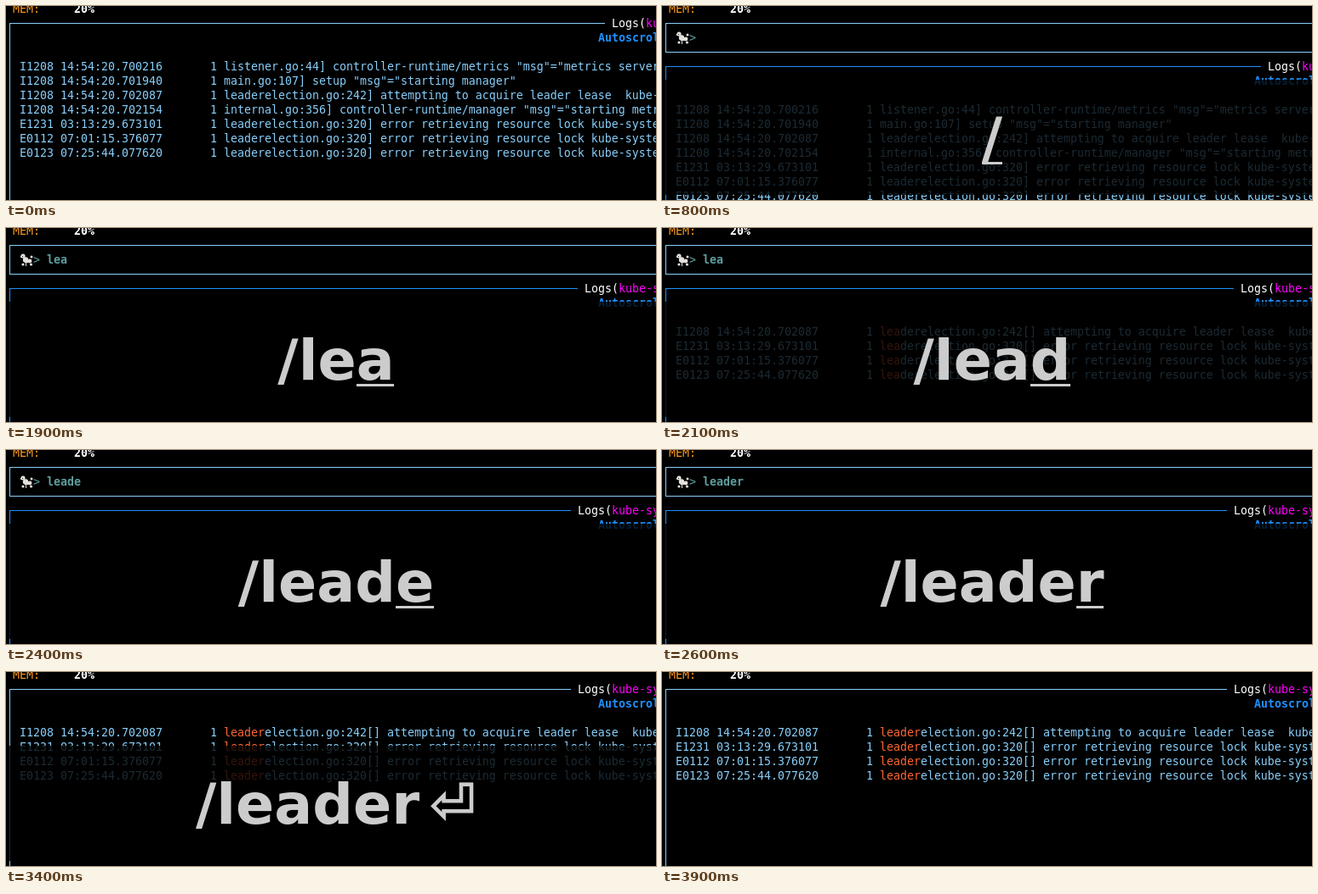
An HTML page with a canvas for the animation above (5.5 s loop, 764 by 229 pixels).

```html
<!DOCTYPE html>
<html lang="en">
<head>
<meta charset="utf-8">
<title>Log filter</title>
<style>
  html, body { margin: 0; width: 100%; height: 100%; overflow: hidden; background: #000; }
  canvas { display: block; }
</style>
</head>
<body>
<canvas id="stage" width="764" height="229"></canvas>
<script>
const W = 764, H = 229, LOOP = 5500, CELL = 8, ROW = 17;
const ctx = document.getElementById('stage').getContext('2d', { alpha: false });

const MONO = '13.29px "DejaVu Sans Mono", monospace';
const KEYS = 'bold 66.67px "DejaVu Sans", sans-serif';
const SKY = '#87cefa', DODGER = '#1e90ff', CADET = '#5f9ea0', MATCH = '#ff6633';

const election = 'leaderelection.go:';
const lockError = election + '320] error retrieving resource lock kube-system';
const logs = [
  ['I1208 14:54:20.700216', 'listener.go:44] controller-runtime/metrics "msg"="metrics server is starting'],
  ['I1208 14:54:20.701940', 'main.go:107] setup "msg"="starting manager"'],
  ['I1208 14:54:20.702087', election + '242] attempting to acquire leader lease  kube-system'],
  ['I1208 14:54:20.702154', 'internal.go:356] controller-runtime/manager "msg"="starting metrics server"'],
  ['E1231 03:13:29.673101', lockError],
  ['E0112 07:01:15.376077', lockError],
  ['E0123 07:25:44.077620', lockError]
];

const word = 'leader';
const typedAt = [1500, 1700, 1900, 2200, 2400, 2600];
const shownKeys = ['/', 'l', 'e', 'a', 'd', 'e', 'r', '\u2006\u23ce'];
const shownAt = [800, 1500, 1700, 1900, 2100, 2300, 2600, 2800];

const passed = (times, t) => times.filter(s => t >= s).length;
const within = (t, from, to) => t >= from && t < to;

function put(text, x, row, color, bold) {
  ctx.font = (bold ? 'bold ' : '') + MONO;
  ctx.fillStyle = color;
  ctx.fillText(text, x, 8 + ROW * row);
}

function box(x, y, w, h, color) {
  ctx.fillStyle = color;
  ctx.fillRect(x, y, w, h);
}

const lineY = row => 3 + ROW * row;

function poodle() {
  ctx.fillStyle = '#e4e0da';
  const puffs = [[20, 33, 2.6], [23, 37.5, 3.2], [28, 39, 2.4], [30, 34, 1.5], [20, 43, 1.6], [29.5, 43, 1.6]];
  for (const [x, y, r] of puffs) {
    ctx.beginPath();
    ctx.arc(x, y, r, 0, 7);
    ctx.fill();
  }
  box(17, 33, 3, 2, '#e4e0da');
  box(22, 38, 7, 3, '#e4e0da');
  box(23, 40, 1, 5, '#e4e0da');
  box(19, 33, 1, 1, '#222');
}

function drawPrompt(typed) {
  box(4, lineY(1), W, 1, SKY);
  box(4, lineY(3), W, 1, SKY);
  box(4, lineY(1), 1, 2 * ROW, SKY);
  poodle();
  put('>', 32, 2, CADET);
  put(word.slice(0, typed), 48, 2, CADET, true);
}

function drawPanel(top, color, typed) {
  const x = typed ? 688 - CELL * Math.floor((typed - 1) / 2) : 712;
  box(4, lineY(top), x - CELL - 4, 1, color);
  box(4, lineY(top), 1, H, color);
  put('Logs(', x, top, '#fff');
  put('kube-system', x + 5 * CELL, top, '#f0f');
  put('Autoscroll: On', 696, top + 1, DODGER, true);
}

function drawLogs(top, typed) {
  const match = word.slice(0, typed);
  const rows = typed ? logs.filter(l => l[1].startsWith(match)) : logs;
  rows.forEach(([stamp, message], i) => {
    const text = typed ? message.replace(']', '[]') : message;
    put(stamp, 16, top + i, SKY);
    put('1', 240, top + i, SKY);
    put(match, 256, top + i, MATCH);
    put(text.slice(typed), 256 + typed * CELL, top + i, SKY);
  });
}

function drawKeys(t) {
  const count = passed(shownAt, t);
  const text = shownKeys.slice(0, count).join('');
  box(0, 87, W, 136, 'rgba(0,0,0,.8)');
  ctx.font = KEYS;
  ctx.fillStyle = '#ccc';
  const width = ctx.measureText(text).width;
  const last = ctx.measureText(text.slice(-1)).width;
  ctx.fillText(text, 388 - width / 2, 179);
  if (!within(t, 1000, 1500) && t < 3100) {
    const end = Math.floor(388 + width / 2);
    const start = Math.round(388 + width / 2 - last);
    box(start, 184, end - start, 3, '#ccc');
  }
}

function draw(t) {
  const typed = passed(typedAt, t);
  const prompting = within(t, 800, 2900);
  const top = prompting ? 4 : 1;
  box(0, 0, W, H, '#000');
  put('MEM:', 8, 0, '#ff9a1f');
  put('20%', 80, 0, '#fff', true);
  if (prompting) drawPrompt(typed);
  drawPanel(top, prompting ? DODGER : SKY, typed);
  if (t < 1500 || within(t, 2000, 2200) || t >= 3400) drawLogs(top + 3, typed);
  if (within(t, 800, 3900)) drawKeys(t);
}

function tick() {
  draw(performance.now() % LOOP);
  requestAnimationFrame(tick);
}
tick();
</script>
</body>
</html>
```
